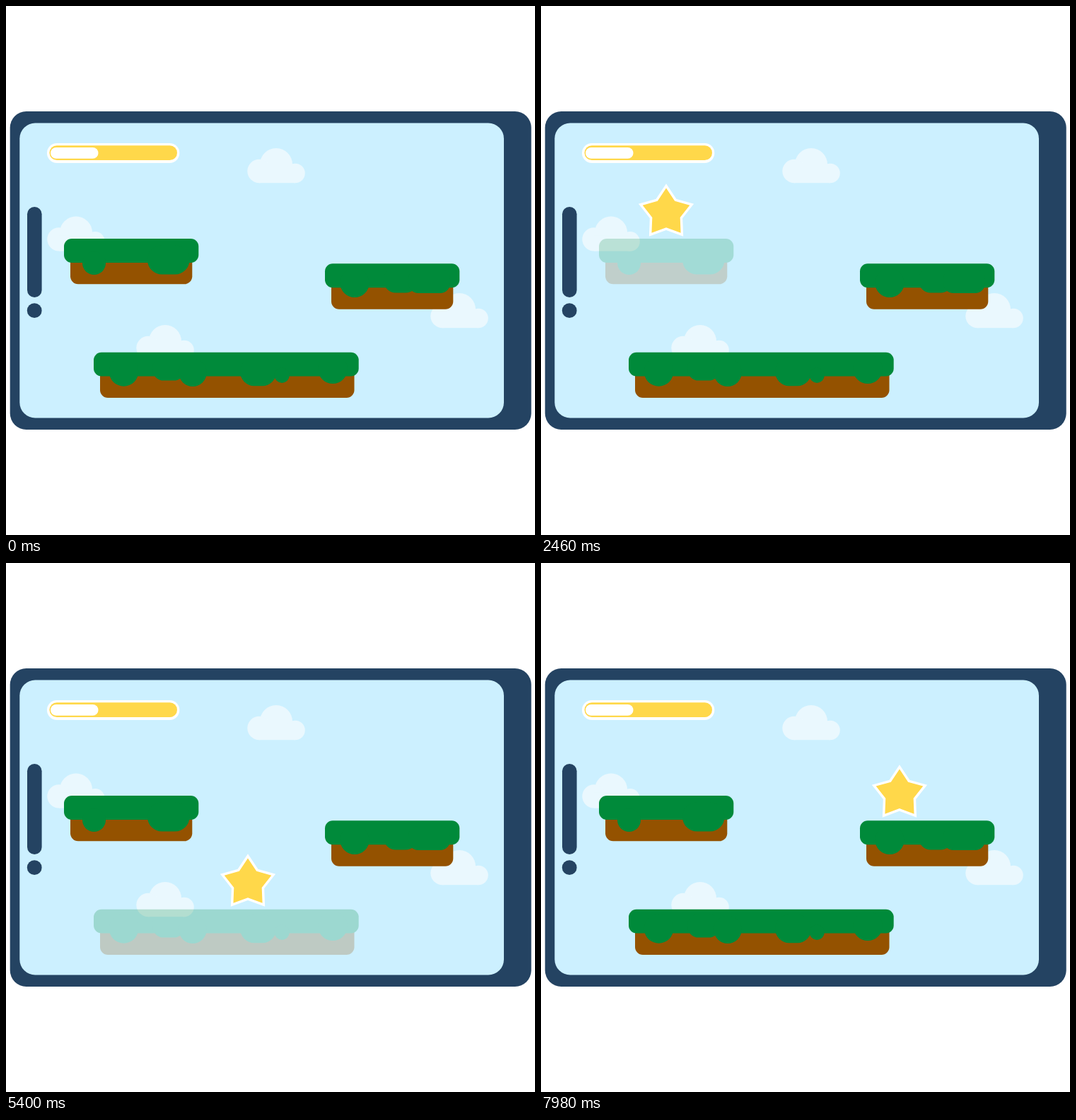
Animation of 748x748 px, one loop 8000 ms. Source, as an HTML page:

```html
<!DOCTYPE html>
<html lang="en">
<head>
<meta charset="utf-8">
<title>Star platforms</title>
<style>
  html, body { margin: 0; width: 100%; height: 100%; overflow: hidden; background: #fff; }
  svg { display: block; width: 100vw; height: 100vh; }
  .grass { fill: #008a3a; }
  .soil { fill: #945200; }
  .navy { fill: #244362; }
</style>
</head>
<body>
<svg viewBox="0 0 748 748">
  <defs>
    <g id="cloud">
      <circle cx="382" cy="224" r="23"/>
      <circle cx="358" cy="233.5" r="16.7"/>
      <circle cx="409" cy="236.5" r="13.8"/>
      <rect x="358" y="228" width="51" height="22.2"/>
    </g>
  </defs>

  <rect class="navy" x="5.7" y="149" width="737" height="450" rx="23"/>
  <rect x="19.3" y="165.5" width="684.7" height="417" rx="22" fill="#ccf0ff"/>
  <rect class="navy" x="30" y="284" width="20.6" height="128" rx="10.3"/>
  <circle class="navy" cx="40.2" cy="430.7" r="10.4"/>

  <rect x="58" y="194" width="187.3" height="28" rx="14" fill="#fff"/>
  <rect x="61.5" y="197.3" width="180.5" height="20.8" rx="10.4" fill="#ffd84a"/>
  <rect x="63" y="200" width="67.5" height="15.8" rx="7.9" fill="#fff"/>

  <g fill="#eaf8fe">
    <use href="#cloud"/>
    <use href="#cloud" x="-283" y="96.4"/>
    <use href="#cloud" x="259" y="205"/>
    <use href="#cloud" x="-157" y="250"/>
  </g>

  <g id="left">
    <rect class="soil" x="91" y="335" width="172.3" height="58.3" rx="11"/>
    <g class="grass">
      <rect x="82" y="329" width="190.3" height="34" rx="11"/>
      <circle cx="124.5" cy="363.5" r="16.5"/>
      <rect x="200" y="338" width="59.5" height="41.6" rx="20.5"/>
    </g>
  </g>

  <g id="right">
    <rect class="soil" x="460" y="370" width="172.3" height="58.8" rx="11"/>
    <g class="grass">
      <rect x="451" y="364.3" width="190.3" height="34" rx="11"/>
      <circle cx="493" cy="391.3" r="20.7"/>
      <rect x="534" y="370" width="48" height="35.6" rx="17"/>
      <rect x="569" y="372" width="59" height="34" rx="14"/>
    </g>
  </g>

  <g id="ground">
    <rect class="soil" x="133" y="495" width="359.5" height="59" rx="11"/>
    <g class="grass">
      <rect x="124" y="489.7" width="374.7" height="33.8" rx="11"/>
      <circle cx="166.5" cy="517" r="20.7"/>
      <rect x="207" y="496" width="46" height="33.6" rx="16"/>
      <circle cx="264" cy="518.2" r="19.8"/>
      <rect x="331" y="497" width="51.5" height="40.2" rx="20"/>
      <circle cx="390.2" cy="522.3" r="10.6"/>
      <circle cx="462" cy="513.2" r="20.8"/>
    </g>
  </g>

  <path id="hopDown" d="M177 292.5q94 -43 165 160" fill="none"/>
  <path id="hopUp" d="M342 452.5q91 -188.3 165.4 -125.7" fill="none"/>
  <polygon id="star" fill="#ffd84a" stroke="#fff" stroke-width="6.8" stroke-miterlimit="10" paint-order="stroke"/>
</svg>
<script>
  const LOOP = 8000;
  const $ = id => document.getElementById(id);
  const [star, left, ground, hopDown, hopUp] =
    ['star', 'left', 'ground', 'hopDown', 'hopUp'].map($);

  star.setAttribute('points', Array.from({ length: 10 }, (_, i) => {
    const r = i % 2 ? 20.7 : 35, a = i * Math.PI / 5;
    return [r * Math.sin(a), -r * Math.cos(a)];
  }).join(' '));

  // cubic-bezier(.42, 0, .58, 1)
  function ease(x) {
    if (x <= 0) return 0;
    if (x >= 1) return 1;
    let lo = 0, hi = 1, p;
    for (let i = 0; i < 20; i++) {
      p = (lo + hi) / 2;
      const bx = 1.26 * p * (1 - p) ** 2 + 1.74 * p * p * (1 - p) + p ** 3;
      if (bx < x) lo = p; else hi = p;
    }
    return 3 * p * p - 2 * p ** 3;
  }

  const span = (t, start, length) => ease((t - start) / length);

  // Fades out and back in, each taking half ms, the given number of times.
  function blink(t, start, half, times) {
    const n = (t - start) / half;
    if (n <= 0 || n >= 2 * times) return 1;
    return ease(Math.abs(n % 2 - 1));
  }

  const along = (path, k) => path.getPointAtLength(k * path.getTotalLength());

  function draw(t) {
    left.setAttribute('opacity', blink(t, 645, 675, 2));
    ground.setAttribute('opacity', blink(t, 4500, 1350, 1));
    star.setAttribute('opacity', span(t, 105, 540) * (t >= 180));
    const pos = t < 7200
      ? along(hopDown, span(t, 3323, 1133))
      : along(hopUp, span(t, 7200, 810));
    star.setAttribute('transform', `translate(${pos.x} ${pos.y})`);
  }

  const begin = performance.now();
  function tick() {
    draw((performance.now() - begin) % LOOP);
    requestAnimationFrame(tick);
  }
  tick();
</script>
</body>
</html>
```
